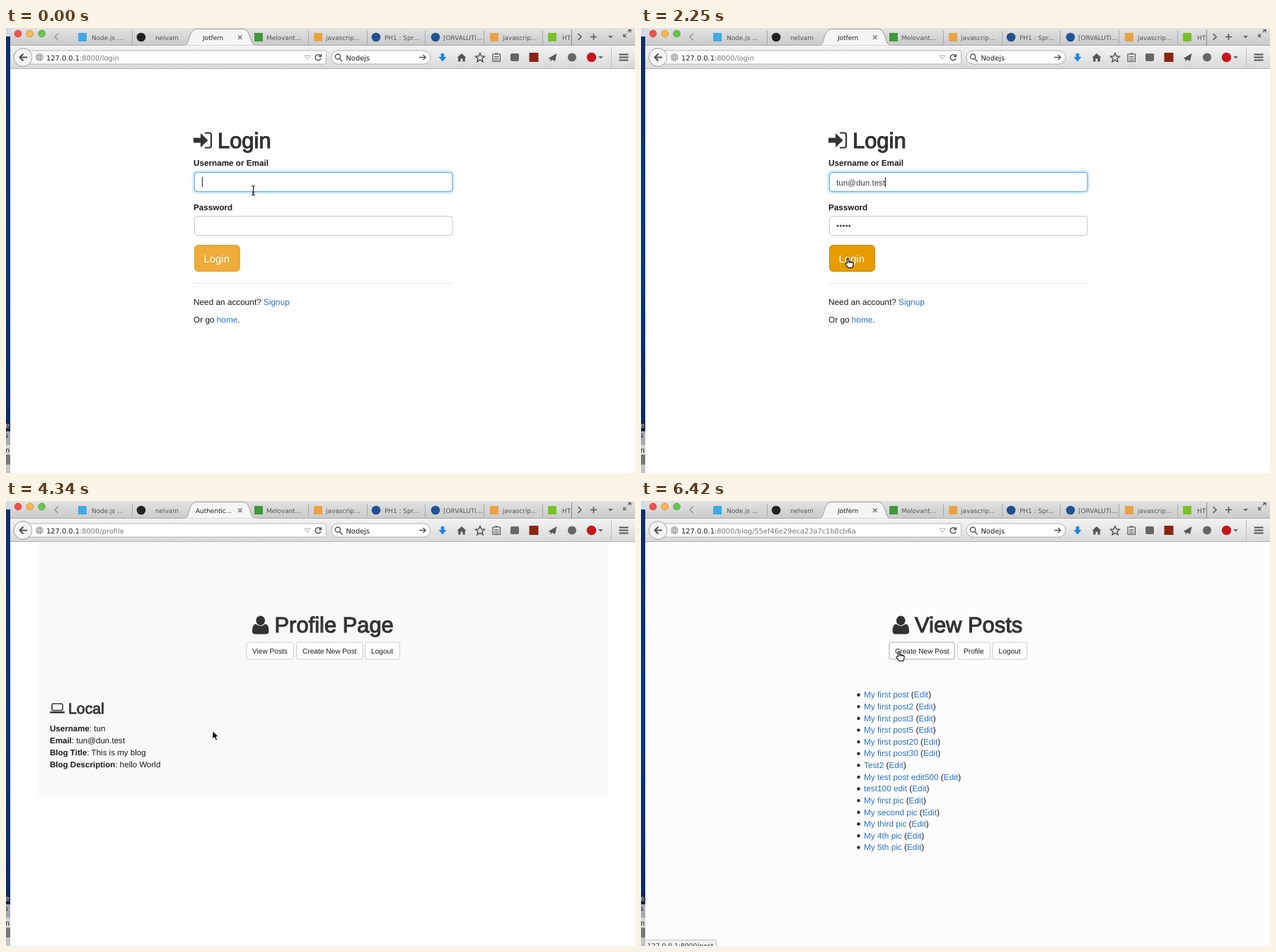
Write an HTML page that moves like this. It is 889 by 630 pixels and loops after 8000 ms.

```html
<!DOCTYPE html>
<html lang="en">
<head>
<meta charset="utf-8">
<title>Login walkthrough</title>
<style>
html, body { margin: 0; width: 100%; height: 100%; overflow: hidden; background: #fff; }
svg { display: block; width: 889px; height: 630px; }
text { font-family: "Liberation Sans", Arial, sans-serif; font-size: 11.8px; fill: #1a1a1a; text-rendering: geometricPrecision; white-space: pre; }
.ui, .tab, .status { font-family: "DejaVu Sans", sans-serif; }
.ui { font-size: 9.85px; }
.tab { font-size: 8.9px; fill: #555; }
.on { fill: #222; }
.status { font-size: 9.2px; fill: #333; }
.big { font-size: 30.9px; fill: #333; stroke: #333; stroke-width: 1.1; }
.mid { font-size: 21.3px; fill: #333; stroke: #333; stroke-width: .8; }
.btn { font-size: 10.15px; fill: #1a1a1a; }
.mail { font-size: 11.6px; fill: #444; }
.fact { font-size: 11.55px; }
.item { font-size: 11.8px; }
.label { font-size: 11.7px; }
.b { font-weight: bold; }
.a { fill: #2b73c7; }
.line { fill: none; stroke: #555; stroke-width: 1.5; }
.thin { stroke-width: 1.2; }
.thick { stroke-width: 2.2; }
</style>
</head>
<body>
<svg viewBox="0 0 889 630">
  <defs>
    <linearGradient id="bar" x2="0" y2="1"><stop stop-color="#e2e2e2"/><stop offset="1" stop-color="#cacaca"/></linearGradient>
    <linearGradient id="tool" x2="0" y2="1"><stop stop-color="#f3f3f3"/><stop offset="1" stop-color="#d8d8d8"/></linearGradient>
    <linearGradient id="desk" x2="0" y2="1"><stop stop-color="#0c2f6c"/><stop offset=".5" stop-color="#0b3681"/><stop offset="1" stop-color="#0a2865"/></linearGradient>
    <filter id="glow" x="-5%" y="-40%" width="110%" height="180%"><feGaussianBlur stdDeviation="2.2"/></filter>
    <clipPath id="cut"><path d="M780 0h19v24h-19z"/></clipPath>
    <g id="user" fill="#333"><ellipse cx="11.7" cy="6.8" rx="6.3" ry="6.8"/><path d="M5 11.5Q0 12.5 0 21.5Q0 26 4.5 26H19Q23.5 26 23.5 21.5Q23.5 12.5 18.5 11.5Q11.7 17.5 5 11.5Z"/></g>
  </defs>

  <rect id="page" x="6" y="58" width="883" height="572"/>

  <!-- desktop edge -->
  <rect width="6" height="630" fill="url(#desk)"/>
  <rect width="6" height="12" fill="#d5d9e2"/>
  <rect y="556" width="6" height="15" fill="#1b2440"/>
  <rect y="571" width="6" height="19" fill="#a5a9b2"/>
  <rect y="590" width="6" height="14" fill="#d4d4d4"/>
  <rect y="604" width="6" height="14" fill="#777"/>
  <rect y="618" width="6" height="12" fill="#c4c4c4"/>
  <text class="ui" x="-1" y="566" style="fill:#ddd">e</text>
  <text class="ui" x="-2" y="580">s</text>
  <text class="ui" x="-1" y="601">n</text>

  <!-- tab strip -->
  <rect x="6" width="883" height="25" fill="url(#bar)"/>
  <rect x="6" y="25" width="883" height="33" fill="url(#tool)"/>
  <path d="M6 24.5H889" stroke="#a9a9a9"/>
  <path d="M6 57.5H889" stroke="#b3b3b3"/>
  <g stroke-width=".6">
    <circle cx="17" cy="8" r="4.9" fill="#f0524a" stroke="#b5342f"/>
    <circle cx="33.7" cy="8" r="4.9" fill="#f5b94a" stroke="#b98426"/>
    <circle cx="50.5" cy="8" r="4.9" fill="#69c552" stroke="#3f8f2e"/>
  </g>
  <path d="M178.5 4V23M427.5 4V23M510.5 4V23M592.5 4V23M675.5 4V23M758.5 4V23" stroke="#aaa"/>
  <path d="M250 25C259 25 257 16 261 8Q264 1.5 270 1.5H334Q341 1.5 343 8C347 16 346 25 355 25Z" fill="#f5f5f5" stroke="#a0a0a0"/>
  <path d="M249 25.5H356" stroke="#f5f5f5" stroke-width="1.4"/>
  <path d="M74 7.5l-5 5l5 5" class="line" style="stroke:#999"/>
  <path d="M328 10.5l5.5 5.5m0-5.5l-5.5 5.5" class="line" style="stroke:#777"/>
  <path d="M799.5 2V24" stroke="#888"/>
  <path d="M808.5 8l4.5 4.5l-4.5 4.5M826 12.5h9M830.5 8v9" class="line"/>
  <path d="M873 12l3.5-3.5M879 6l3.5-3.5M873 8.5V12.5H877M879 2.5H883V6.5" class="line thin"/>
  <path d="M851 11h7l-3.5 3.5z" fill="#666"/>
  <g id="tabs"></g>

  <!-- toolbar -->
  <rect x="30" y="32" width="422.5" height="19" rx="2" fill="#fff" stroke="#b5b5b5"/>
  <circle cx="24" cy="41.5" r="12.8" fill="#f6f6f6" stroke="#9c9c9c"/>
  <path d="M30 41.5H19.5M24.5 36.5l-5 5l5 5" class="line thick"/>
  <circle cx="47.3" cy="41.5" r="5.6" fill="#a5a5a5"/>
  <path d="M42 41.5H53M47.3 36V47M44.5 37q-2 4.5 0 9M50 37q2 4.5 0 9" fill="none" stroke="#e8e8e8" stroke-width=".8"/>
  <path d="M422 39h8l-4 5.5z" fill="none" stroke="#aaa"/>
  <path d="M444.5 39.5A4 4 0 1 0 445 43M445.5 37V40.5H442" class="line" data-on="0-4190 4340-6130 6270-8000"/>
  <path d="M438 38.5l6.5 6.5m0-6.5l-6.5 6.5" class="line" data-on="4190-4340 6130-6270"/>
  <rect x="460" y="32" width="140" height="19" rx="9.5" fill="#fff" stroke="#b0b0b0"/>
  <path d="M471.5 43.5l4 4" class="line"/>
  <circle cx="469" cy="40.5" r="3.6" class="line"/>
  <text class="ui" x="480.5" y="45.5">Nodejs</text>
  <path d="M584 41.5h9M589.5 38l3.5 3.5l-3.5 3.5" class="line"/>
  <path d="M614.8 36h4.4v5h3.3l-5.5 6.5l-5.5-6.5h3.3z" fill="#1f82e5"/>
  <path d="M637.5 42l6.5-6l6.5 6h-1.7v5.5h-3.3v-4h-3v4h-3.3V42z" fill="#555"/>
  <path d="M670 35.5l1.9 4.2l4.5.5l-3.4 3l1 4.5l-4-2.3l-4 2.3l1-4.5l-3.4-3l4.5-.5z" class="line"/>
  <path d="M688 37h10.5v10.5H688zM691 36h4.5M690 40.5h6.5M690 43h6.5M690 45.5h6.5" class="line thin"/>
  <rect x="713" y="36" width="12" height="11" rx="2" fill="#666"/>
  <rect x="739.5" y="35" width="13" height="13" fill="#8c2414"/>
  <path d="M766.5 43l12-7l-2.5 11l-4-2.3l-2.5 3v-3.5z" fill="#555"/>
  <circle cx="800" cy="41.5" r="6" fill="#666"/>
  <circle cx="827.5" cy="41.5" r="6.7" fill="#c9151b"/>
  <path d="M837 40h7l-3.5 3.5z" fill="#666"/>
  <path d="M855.5 27V56" stroke="#c0c0c0"/>
  <path d="M866.5 37.5h13M866.5 41.5h13M866.5 45.5h13" class="line thick"/>
  <text class="ui" x="57" y="45.5">127.0.0.1<tspan id="path" fill="#777"></tspan></text>

  <!-- login page -->
  <g data-on="0-4340">
    <path d="M265 155.5h10v-6.5l10.5 10l-10.5 10v-6.5h-10z" fill="#333"/>
    <path d="M281 148.5h6q3 0 3 3v15q0 3-3 3h-6" class="line thick" style="stroke:#333"/>
    <text class="big" x="299" y="169.5">Login</text>
    <text class="b label" x="265" y="195">Username or Email</text>
    <text class="b label" x="265" y="257.5">Password</text>
    <rect data-on="0-4190" x="265.5" y="203.5" width="366" height="29" rx="4" fill="#8cc6f5" filter="url(#glow)"/>
    <rect x="266.5" y="204.5" width="364.5" height="27" rx="3.5" fill="#fff" stroke="#ccc"/>
    <rect data-on="0-4190" x="266.5" y="204.5" width="364.5" height="27" rx="3.5" fill="none" stroke="#66afe9"/>
    <rect x="266.5" y="266.5" width="364.5" height="27" rx="3.5" fill="#fff" stroke="#c8c8c8"/>
    <text id="name" class="mail" x="276" y="222.5"></text>
    <path id="caret" d="M.5 211V225" stroke="#222"/>
    <path data-on="1200-4340" d="M278 280H296" stroke="#444" stroke-width="3" stroke-linecap="round" stroke-dasharray="0 4.2"/>
    <rect id="submit" x="266.5" y="307.5" width="63.8" height="37" rx="5"/>
    <text x="279.5" y="332" style="font-size:14.9px;fill:#fff">Login</text>
    <path d="M266 361.5H631.5" stroke="#e6e6e6"/>
    <text x="265" y="391.5">Need an account? <tspan class="a">Signup</tspan></text>
    <text x="265" y="416.5">Or go <tspan class="a">home</tspan>.</text>
    <g data-on="150-1200">
      <rect x="266" y="236" width="366" height="28" opacity=".5" filter="url(#glow)"/>
      <rect x="266" y="232" width="366" height="30" fill="#fff"/>
      <rect data-on="900-1200" x="266" y="232" width="366" height="15" fill="#3b78dd"/>
      <text id="hint" class="ui" x="269" y="243.5">tun@dun.test</text>
      <text class="ui" x="269" y="258.5">tun</text>
    </g>
  </g>

  <!-- profile page -->
  <g data-on="4340-6270">
    <rect x="46" y="58" width="806" height="361" fill="#f9f9f9"/>
    <path data-on="5240-6270" d="M290 250H346V341H290z" fill="#f4f4f4"/>
    <g data-on="5390-6270">
      <path d="M334 199H407V250H334z" fill="#fdfdfd"/>
      <path d="M334 250H407V262H334z" fill="#f4f4f4"/>
      <path d="M334 232.5H407M290 249.5H407" stroke="#e4e4e4"/>
    </g>
    <use href="#user" x="348" y="162.5"/>
    <text class="big" x="379.5" y="186">Profile Page</text>
    <g id="profileBtns"></g>
    <rect x="65" y="287" width="15" height="9.5" rx="1.5" class="line" style="stroke:#333"/>
    <path d="M62 298h21v1q0 1.5-2 1.5h-17q-2 0-2-1.5z" fill="#333"/>
    <text class="mid" x="88" y="301">Local</text>
    <g id="facts"></g>
  </g>

  <!-- posts page -->
  <g data-on="6270-8000">
    <use href="#user" x="355.5" y="162.5"/>
    <text class="big" x="387" y="186">View Posts</text>
    <g id="postBtns"></g>
    <g id="posts"></g>
  </g>

  <g id="status">
    <rect id="statusBox" x="5.5" y="621.5" height="12" rx="2" fill="#f1f1f1" stroke="#c2c2c2"/>
    <text id="statusText" class="status" x="9" y="632.5"></text>
  </g>

  <g id="pointer">
    <path id="beam" d="M-2.5 -6.5Q0 -6.5 0 -5V5Q0 6.5 -2.5 6.5M2.5 -6.5Q0 -6.5 0 -5V5Q0 6.5 2.5 6.5M-1.5 2.5H1.5" fill="none" stroke="#111" stroke-width="1.1"/>
    <path id="arrow" d="M0 0V11.5L2.7 9L4.5 13.4L6.6 12.5L4.8 8.3H8.4Z" stroke="#fff" stroke-width=".9"/>
    <g id="hand" stroke="#000">
      <path d="M3.5 8V2Q3.5.8 4.6.8T5.7 2V5.8Q6.9 4.9 7.7 6Q8.9 5.5 9.6 6.6Q11.8 6.3 12 8V10.5L10.7 14.5H5L1 9.8Q.7 8 2.2 8Z" fill="#fff" stroke-width="1.1"/>
      <path d="M5.7 5.8V8M7.7 6V8M9.6 6.6V8.3" stroke-width=".8"/>
    </g>
  </g>
</svg>
<script>
const LOOP = 8000;
const $ = id => document.getElementById(id);
const show = (el, on) => { el.style.display = on ? '' : 'none'; };
const put = (el, s) => { if (el.textContent !== s) el.textContent = s; };
const paint = (el, fill, stroke) => { el.setAttribute('fill', fill); el.setAttribute('stroke', stroke); };

// Favicon shape, its centre x and colour, then the label and its x
const tabs = [
  ['box', 108, '#3fa9e6', 'Node.js ...', 121], ['dot', 191, '#222', 'nelvam', 211],
  ['box', 357, '#3f9a3c', 'Melovant...', 368], ['box', 441, '#e9a345', 'javascrip...', 452],
  ['dot', 523, '#24508f', 'PH1 : Spr...', 535], ['dot', 607, '#1f5596', '[ORVALUTI...', 618],
  ['box', 690, '#e9a345', 'javascrip...', 702], ['box', 772, '#7ac127', 'HTML', 786]
];
$('tabs').innerHTML = tabs.map(([kind, x, color, label, tx]) =>
  (kind === 'box' ? `<rect x="${x - 6}" y="7" width="12" height="12" fill="${color}"/>`
                  : `<circle cx="${x}" cy="13" r="6.3" fill="${color}"/>`) +
  `<text class="tab" x="${tx}" y="17"${label === 'HTML' ? ' clip-path="url(#cut)"' : ''}>${label}</text>`).join('') +
  '<text id="title" class="tab on" y="17"></text>' +
  '<circle id="busy" cx="269" cy="13" r="4" class="line" stroke-dasharray="2 1.1"/>';

const buttons = list => list.map(([x, w, label, tx]) =>
  `<rect x="${x + .5}" y="200" width="${w}" height="24" rx="2.5" fill="#fff" stroke="#ccc"/>` +
  `<text class="btn" x="${tx}" y="215.5">${label}</text>`).join('');
$('profileBtns').innerHTML = buttons([[339.5, 66.5, 'View Posts', 348], [410, 93.5, 'Create New Post', 419], [507, 49, 'Logout', 516]]);
$('postBtns').innerHTML = buttons([[350.5, 92, 'Create New Post', 359], [447, 46, 'Profile', 456], [496.5, 48.5, 'Logout', 505.5]]);
$('postBtns').firstChild.setAttribute('stroke', '#a5a5a5');

const facts = [['Username', 'tun'], ['Email', 'tun@dun.test'], ['Blog Title', 'This is my blog'], ['Blog Description', 'hello World']];
$('facts').innerHTML = facts.map(([key, value], i) =>
  `<text class="fact" x="62" y="${326 + 16.9 * i}"><tspan class="b">${key}</tspan>: ${value}</text>`).join('');

const posts = ['', '2', '3', '5', '20', '30'].map(n => 'My first post' + n).concat(
  'Test2', 'My test post edit500', 'test100 edit', ['first', 'second', 'third', '4th', '5th'].map(n => `My ${n} pic`));
$('posts').innerHTML = posts.map((post, i) => {
  const y = 278.3 + 16.62 * i;
  return `<circle cx="307.5" cy="${y - 3.8}" r="2.2" fill="#222"/>` +
    `<text class="item" x="315" y="${y}"><tspan class="a">${post}</tspan> (<tspan class="a">Edit</tspan>)</text>`;
}).join('');

// Each step is [start, ...values], held until the next one
const blogPath = ':8000/blog/55ef46e29eca23a7c1b8cb6a';
const tracks = {
  title: [[0, 'Jotfern', 278], [4190, 'Connecti...', 277], [4340, 'Authentic...', 268], [6130, 'Connecti...', 277], [6270, 'Jotfern', 278]],
  path: [[0, ':8000/login'], [4340, ':8000/profile'], [6270, blogPath]],
  name: [[0, ''], [150, 't'], [300, 'tu'], [450, 'tun'], [1200, 'tun@dun.test']],
  caret: [[0, 277], [150, 279], [300, 287], [450, 293], [1050, 0], [1200, 345], [1650, 0], [2250, 345], [2850, 0], [3440, 345], [4040, 0]],
  pointer: [[0, 'beam', 349.5, 230], [1500, 'arrow', 311, 298], [1650, 'hand', 288, 325], [4340, 'arrow', 292, 325.5],
    [5240, 'arrow', 337, 248], [5390, 'hand', 352, 207], [5530, 'hand', 357, 208], [5680, 'hand', 360, 212]],
  status: [[0, '', 0], [5830, '127.0.0.1' + blogPath, 234], [5980, 'Connecting to 127.0.0.1...', 138],
    [6130, 'Waiting for 127.0.0.1...', 128], [6270, '', 0], [6420, '127.0.0.1:8000/post', 101]],
  submit: [[0, '#eeac38', '#e5a01f'], [1650, '#e89c00', '#c28100']],
  view: [[0, '#fff', '#ccc'], [5390, '#ebebeb', '#adadad'], [5980, '#dcdcdc', '#8c8c8c']]
};
const at = (key, t) => tracks[key].findLast(step => step[0] <= t).slice(1);

const timed = [...document.querySelectorAll('[data-on]')].map(el => ({
  el, spans: el.dataset.on.split(' ').map(s => s.split('-').map(Number))
}));

function draw(t) {
  for (const { el, spans } of timed) show(el, spans.some(([a, b]) => t >= a && t < b));

  const [title, titleX] = at('title', t);
  put($('title'), title);
  $('title').setAttribute('x', titleX);
  show($('busy'), title.startsWith('Connecti'));
  put($('path'), at('path', t)[0]);
  put($('name'), at('name', t)[0]);

  const [caretX] = at('caret', t);
  show($('caret'), caretX);
  $('caret').setAttribute('transform', `translate(${caretX})`);
  $('hint').style.fill = t >= 900 ? '#fff' : '#222';

  paint($('submit'), ...at('submit', t));
  paint($('profileBtns').firstChild, ...at('view', t));
  $('page').setAttribute('fill', t < 6270 ? '#fefefe' : '#fcfcfc');

  const [status, width] = at('status', t);
  show($('status'), status);
  put($('statusText'), status);
  $('statusBox').setAttribute('width', width);

  const [shape, x, y] = at('pointer', t);
  for (const id of ['beam', 'arrow', 'hand']) show($(id), id === shape);
  $('pointer').setAttribute('transform', `translate(${x} ${y})`);
}

const start = performance.now();
function tick() {
  draw((performance.now() - start) % LOOP);
  requestAnimationFrame(tick);
}
tick();
</script>
</body>
</html>
```
